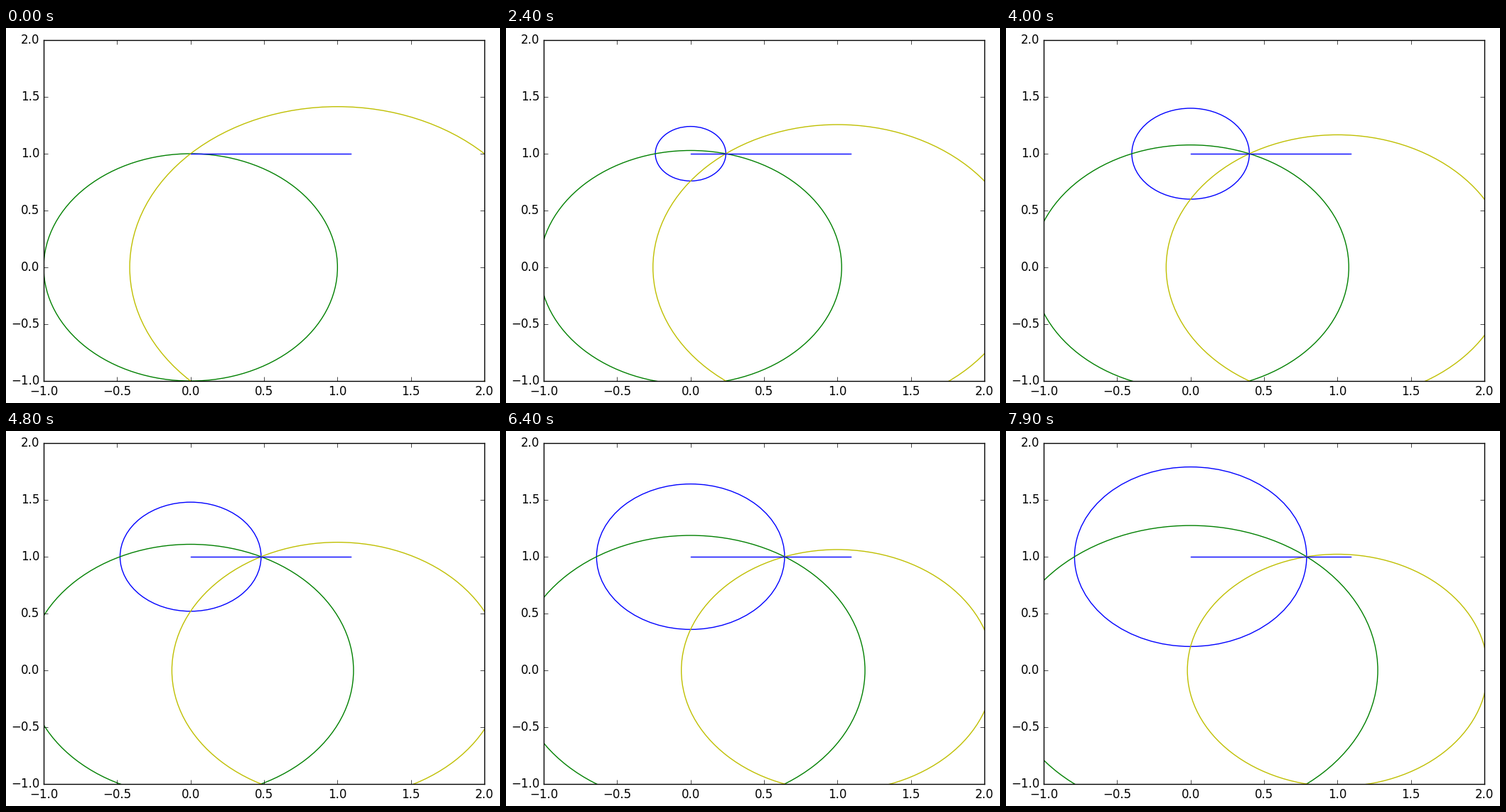
A matplotlib script for the animation above (8 s loop, 695 by 528 pixels).

```python
import numpy as np
import matplotlib.pyplot as plt
from matplotlib.animation import FuncAnimation
from matplotlib.patches import Circle

W, H, DPI = 695, 528, 100
FRAMES, INTERVAL = 80, 100
STEP = 0.01

plt.style.use("classic")
plt.rcParams["font.family"] = "DejaVu Sans"

fig = plt.figure(figsize=(W / DPI, H / DPI), dpi=DPI, facecolor="white")
ax = fig.add_axes([53 / W, 31 / H, 620 / W, 480 / H])
ax.set_xlim(-1, 2)
ax.set_ylim(-1, 2)
ticks = np.arange(-1, 2.1, 0.5)
ax.set_xticks(ticks)
ax.set_yticks(ticks)


def ring(center, color):
    return ax.add_patch(Circle(center, 0, fill=False, edgecolor=color, linewidth=1))


blue = ring((0, 1), "#0000ff")
green = ring((0, 0), "#008000")
yellow = ring((1, 0), "#bfbf00")
ax.plot([0, 1.09], [1, 1], color="#0000ff", linewidth=1)


def update(i):
    # All three circles meet at the point (x, 1) sliding along the line.
    x = i * STEP
    blue.set_radius(x)
    blue.set_visible(i > 0)
    green.set_radius(np.hypot(x, 1))
    yellow.set_radius(np.hypot(1 - x, 1))
    return blue, green, yellow


anim = FuncAnimation(fig, update, frames=FRAMES, interval=INTERVAL,
                     repeat=True, repeat_delay=0, blit=False)
plt.show()
```
